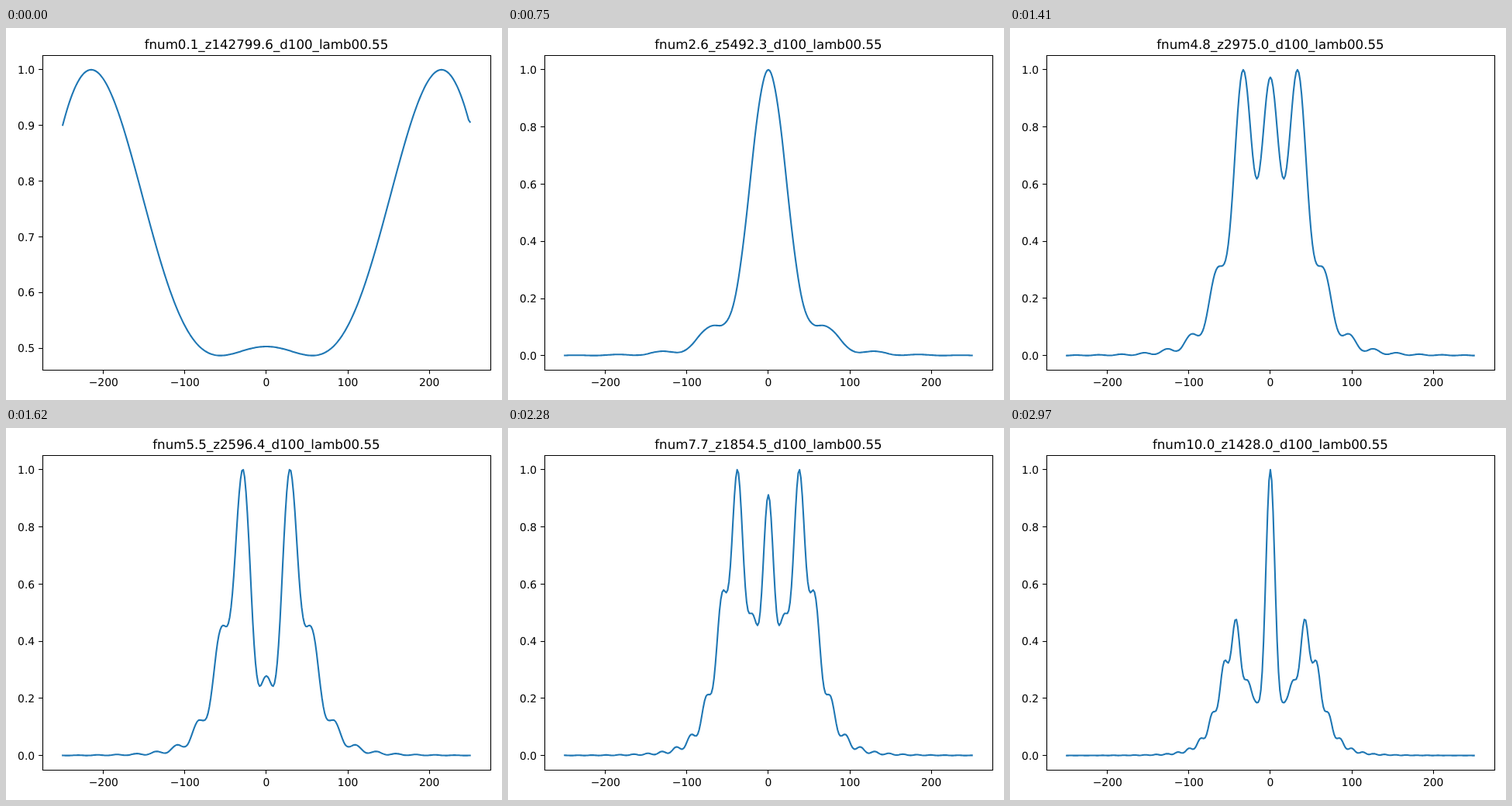
Write an HTML page that moves like this. It is 640x480 px and loops after 3 s.

```html
<!DOCTYPE html>
<html lang="en">
<head>
<meta charset="utf-8">
<title>Circular aperture diffraction</title>
<style>
html, body { margin: 0; width: 100%; height: 100%; overflow: hidden; background: #fff; }
svg { display: block; width: 640px; height: 480px; }
text { font: 13.89px "DejaVu Sans", sans-serif; text-anchor: middle; text-rendering: geometricPrecision; }
#title { font-size: 16.67px; }
#yAxis text { text-anchor: end; }
#frame, .tick { fill: none; stroke: #000; stroke-width: 1.1; }
#curve { fill: none; stroke: #1f77b4; stroke-width: 2.083; stroke-linejoin: round; stroke-linecap: square; }
</style>
</head>
<body>
<svg viewBox="0 0 640 480">
  <path id="curve"/>
  <g id="xAxis"></g>
  <g id="yAxis"></g>
  <path id="frame"/>
  <text id="title" y="27"></text>
</svg>
<script>
const STEP_MS = 30, COUNT = 100;
const TOP = 35.4, BOTTOM = 441.1, RIGHT = 625;
const MARGIN = 1 / 22;
const HALF = 250;                // half width of the x axis data
const RADIUS = 50, WAVE = 0.55;
const AREA = 3.141592 * RADIUS * RADIUS;
const REACH = 150;               // half width of the simulated window
const LAST = REACH - 0.6;        // the window stops just short on the right
const PERIOD = 592;              // padded grid
const MAX_ORDER = 226;

const $ = id => document.getElementById(id);
const snap = v => Math.floor(v) + 0.5;

// 2 J1(u) / u
function jinc(u) {
  if (u < 1e-6) return 1;
  const k = Math.ceil(u / 2 + 12);
  let sum = 0;
  for (let i = 0; i < k; i++) {
    const a = Math.PI * (i + 0.5) / k;
    sum += Math.cos(a - u * Math.sin(a));
  }
  return 2 * sum / k / u;
}

// Fourier coefficients of the aperture
const coef = [];
for (let n = 0; n <= MAX_ORDER; n++) {
  coef.push(new Float64Array(MAX_ORDER + 1));
  for (let m = 0; m <= n; m++) {
    coef[n][m] = coef[m][n] = jinc(2 * Math.PI * RADIUS * Math.hypot(n, m) / PERIOD);
  }
}

// Band-limited propagation; intensity along the middle row
function profile(fnum) {
  const spread = AREA / fnum;    // wavelength * distance
  const limit = Math.min(MAX_ORDER, Math.floor(PERIOD * PERIOD / (2 * spread)));
  const phase = Math.PI * spread / (PERIOD * PERIOD);
  const re = [], im = [], orders = [];
  for (let n = 0; n <= limit; n++) {
    const w = n ? 2 : 1;
    re.push(w * Math.cos(phase * n * n));
    im.push(-w * Math.sin(phase * n * n));
  }
  for (let n = 0; n <= limit; n++) {
    let a = 0, b = 0;
    for (let m = 0; m <= limit; m++) {
      a += coef[n][m] * re[m];
      b += coef[n][m] * im[m];
    }
    orders.push([a * re[n] - b * im[n], a * im[n] + b * re[n]]);
  }
  const out = [];
  for (let x = -REACH; x <= REACH; x++) {
    const t = 2 * Math.PI * Math.min(x, LAST) / PERIOD;
    let a = 0, b = 0;
    orders.forEach(([p, q], n) => {
      const c = Math.cos(n * t);
      a += p * c;
      b += q * c;
    });
    out.push(a * a + b * b);
  }
  const peak = Math.max(...out);
  return out.map(v => v / peak);
}

function tickStep(range) {
  const raw = range / 9, scale = 10 ** Math.floor(Math.log10(raw));
  return [1, 2, 2.5, 5, 10].map(s => s * scale).find(s => s >= raw);
}

const line = d => `<path class="tick" d="${d}"/>`;
const label = (x, y, s) => `<text x="${x}" y="${y}">${s}</text>`;

function build(i) {
  const fnum = (i + 1) / 10;
  const data = profile(fnum);
  const low = Math.min(...data);
  const pad = (1 - low) * 0.05, range = (1 - low) * 1.1;
  const step = tickStep(range);
  const digits = Math.max(1, [0, 1, 2, 3].find(d => Math.abs(step * 10 ** d - Math.round(step * 10 ** d)) < 1e-9));
  const left = 46.9 + (digits - 1) * 8.84;
  const edge = snap(left + 0.3);
  const width = RIGHT - left;
  const px = x => left + width * (MARGIN + (1 - 2 * MARGIN) * (x + HALF) / (2 * HALF));
  const py = v => BOTTOM - (BOTTOM - TOP) * (v - low + pad) / range;

  let xAxis = "", yAxis = "";
  for (let x = -200; x <= 200; x += 100) {
    xAxis += line(`M${snap(px(x))} 441v5.4`) + label(px(x).toFixed(2), 462, String(x).replace("-", "\u2212"));
  }
  for (let k = Math.ceil((low - pad) / step); k * step <= 1 + pad; k++) {
    const y = py(k * step);
    yAxis += line(`M${edge} ${snap(y)}h-5.4`) + label((left - 9.7).toFixed(2), Math.round(y + 5.2), (k * step).toFixed(digits));
  }
  const points = data.map((v, j) => px((j / REACH - 1) * HALF).toFixed(2) + " " + py(v).toFixed(2));
  return {
    xAxis, yAxis,
    frame: `M${edge} 35.5H625.5V441.5H${edge}Z`,
    curve: "M" + points.join("L"),
    title: `fnum${fnum.toFixed(1)}_z${(AREA / WAVE / fnum).toFixed(1)}_d100_lamb00.55`,
    middle: (left + RIGHT) / 2
  };
}

const cache = [];
let shown = -1;

function draw(now) {
  const i = Math.floor(Math.max(0, now - start) / STEP_MS) % COUNT;
  if (i !== shown) {
    const s = cache[i] || (cache[i] = build(i));
    $("xAxis").innerHTML = s.xAxis;
    $("yAxis").innerHTML = s.yAxis;
    $("frame").setAttribute("d", s.frame);
    $("curve").setAttribute("d", s.curve);
    $("title").setAttribute("x", s.middle);
    $("title").textContent = s.title;
    shown = i;
  }
  requestAnimationFrame(draw);
}

const start = performance.now();
draw(start);
</script>
</body>
</html>
```
